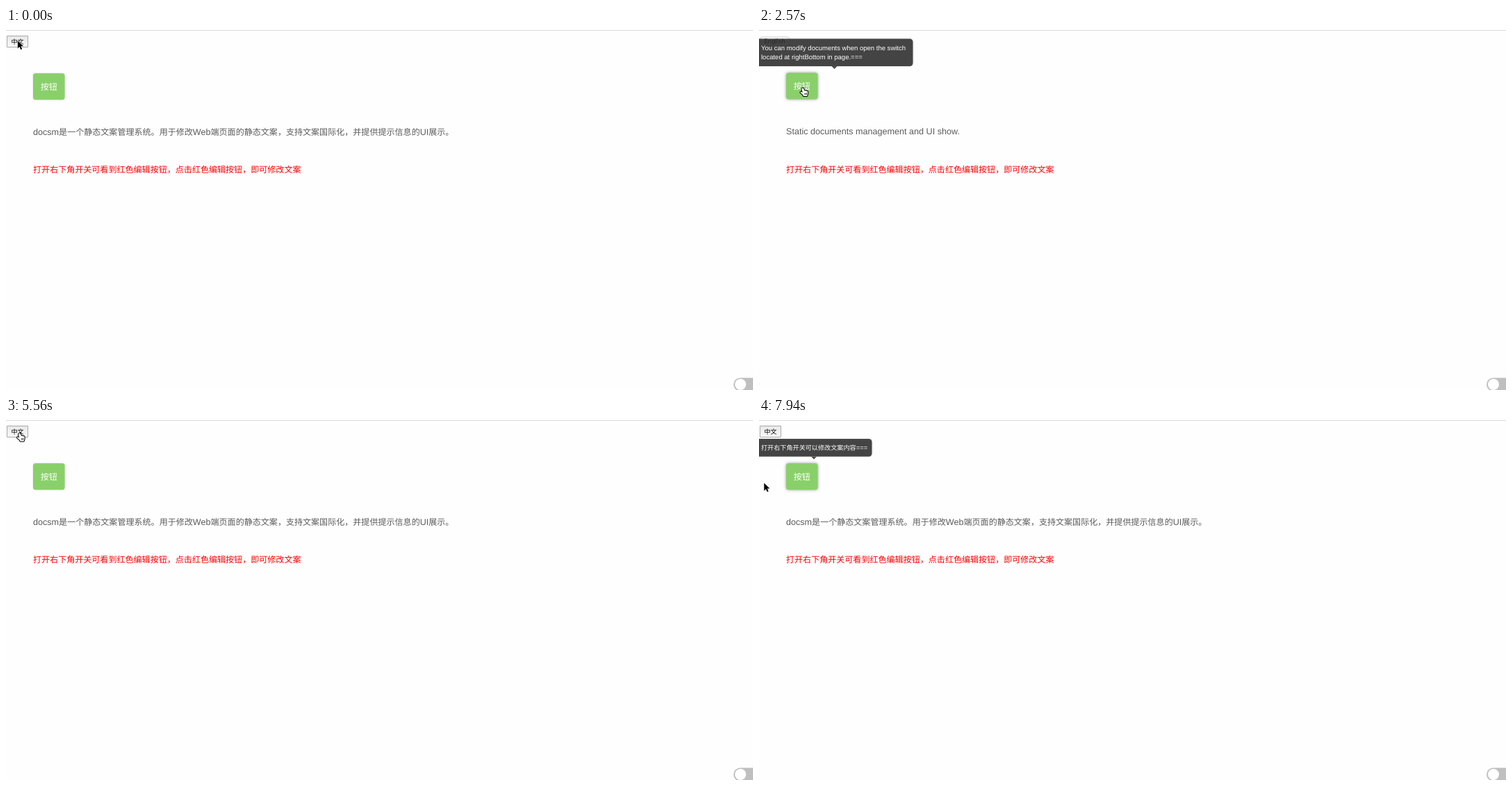
These frames come from a looping animation (1075x521 px, 8000 ms). An HTML page with a canvas:

```html
<!DOCTYPE html>
<html lang="zh-CN">
<head>
<meta charset="utf-8">
<style>
html, body { margin: 0; width: 100%; height: 100%; overflow: hidden; background: #fefefe; }
canvas { display: block; }
</style>
</head>
<body>
<canvas id="stage" width="1075" height="521"></canvas>
<script>
const ctx = document.getElementById('stage').getContext('2d');
const LOOP = 8000;
const CJK = '"Noto Sans CJK SC", "Noto Sans CJK", sans-serif';
const LATIN = '"Liberation Sans", Arial, sans-serif';

const HAND = new Path2D('M4 1.1 Q5.2 .5 5.8 1.7 L6.8 4.7 Q7.9 4.1 8.5 5 Q9.5 4.5 10.1 5.4 Q11.5 5.2 11.7 6.5 ' +
  'L11.6 9.2 L10.6 12.4 H5.6 L4.5 10.4 L1 7.4 Q.9 5.9 2.6 6.4 L4.2 7.6 L2.9 2.6 Q2.8 1.5 4 1.1 Z');
const HAND_LINES = new Path2D('M7.2 8.2 L7.5 10.7 M8.8 8 V10.6 M10.2 7.8 L10 10.4');
const ARROW = new Path2D('M0 0 V11.2 L2.6 8.8 L4.4 12.8 L6.4 12 L4.7 8 H8.2 Z');
const BEAM = new Path2D('M-2.5 -6 Q0 -6 0 -4.5 Q0 -6 2.5 -6 M0 -4.5 V4.5 M-2.5 6 Q0 6 0 4.5 Q0 6 2.5 6 M-1.5 1.5 H1.5');

// time, x, y, cursor; each pose holds until the next one
const pointer = [
  [0, 16.8, 18.3, 'arrow'], [600, 17, 22, 'hand'],
  [1970, 17, 23.5, 'hand'], [2120, 32, 46, 'arrow'], [2270, 51, 74, 'hand'], [2420, 58, 86, 'hand'],
  [2570, 58.5, 85.5, 'hand'],
  [3470, 63, 89, 'hand'], [3620, 80, 113, 'arrow'], [3770, 102, 146, 'beam'], [3910, 117, 174, 'arrow'],
  [4060, 122, 163, 'arrow'], [4210, 121.5, 152, 'beam'], [4360, 90, 112, 'arrow'], [4510, 44, 62, 'arrow'],
  [4660, 16, 36, 'arrow'], [4810, 5, 27, 'arrow'], [4960, 3, 25, 'hand'], [5110, 9, 23, 'hand'], [5260, 15, 21, 'hand'],
  [6160, 27, 42, 'arrow'], [6300, 46, 72, 'hand'], [6450, 56, 90, 'hand'], [6600, 57, 91.5, 'hand'],
  [7200, 53, 108, 'arrow'], [7350, 42, 123, 'arrow'], [7500, 28, 121, 'arrow'],
  [7650, 17, 112, 'arrow'], [7800, 10, 102, 'arrow'], [7940, 7.3, 93.5, 'arrow']
];

const within = (t, from, to) => t >= from && t < to;

// Latin runs are set slightly larger than the Chinese around them
function text(string, x, y, size, color) {
  ctx.fillStyle = color;
  for (const run of string.match(/[ -~]+|[^ -~]+/g)) {
    ctx.font = run.charCodeAt(0) < 128 ? `${size * 1.045}px ${LATIN}` : `${size}px ${CJK}`;
    ctx.fillText(run, x, y);
    x += ctx.measureText(run).width;
  }
}

function box(x, y, w, h, r, fill, border) {
  ctx.beginPath();
  ctx.roundRect(x, y, w, h, r);
  ctx.fillStyle = fill;
  ctx.fill();
  if (border) {
    ctx.strokeStyle = border;
    ctx.lineWidth = 1;
    ctx.stroke();
  }
}

function languageButton(english, pressed) {
  if (english) {
    ctx.save();
    ctx.shadowColor = 'rgba(0,0,0,.15)';
    ctx.shadowBlur = 1;
    ctx.shadowOffsetY = .5;
    box(2, 12.5, 41.5, 12.5, 3, pressed ? '#eee' : '#fff', '#e2e2e2');
    ctx.restore();
    ctx.font = '500 8.8px Inter, sans-serif';
    ctx.fillStyle = '#111';
    ctx.fillText('English', 7.3, 22.4);
    return;
  }
  const shade = ctx.createLinearGradient(0, 12, 0, 27);
  shade.addColorStop(0, pressed ? '#d2d2d2' : '#e8e8e8');
  shade.addColorStop(1, pressed ? '#e2e2e2' : '#f9f9f9');
  box(1.5, 11.5, 30, 16, 0, shade, '#aaa');
  text('中文', 7.5, 22.8, 9.1, '#000');
}

function greenButton(y, raised) {
  ctx.save();
  ctx.shadowColor = raised ? 'rgba(0,0,0,.4)' : 'rgba(0,0,0,.2)';
  ctx.shadowBlur = raised ? 4 : 2;
  box(39, y, 45.5, 38, 3.5, '#89d06a');
  ctx.restore();
  text('按钮', 49.8, y + 23.8, 12.06, '#fff');
}

function tooltip(y, w, h, tip, lines) {
  const bottom = y + h;
  ctx.save();
  ctx.shadowColor = 'rgba(0,0,0,.2)';
  ctx.shadowBlur = 2;
  box(-6, y, w + 6, h, 4.5, 'rgba(50,50,50,.88)');
  ctx.restore();
  ctx.fillStyle = '#4b4b4b';
  ctx.beginPath();
  ctx.moveTo(tip - 4, bottom);
  ctx.lineTo(tip + 4, bottom);
  ctx.lineTo(tip, bottom + 4);
  ctx.fill();
  lines.forEach((line, i) => text(line, 3, y + 16.3 + i * 13.6, 9.12, '#fff'));
}

function toggle() {
  box(1047, 503.5, 40, 19, 9.5, '#bfbfbf');
  box(1049, 505, 16, 16, 8, '#fff');
}

function outlined(path, width, outer, inner) {
  ctx.lineJoin = 'round';
  ctx.lineWidth = width;
  ctx.strokeStyle = outer;
  ctx.stroke(path);
  ctx.fillStyle = inner;
  ctx.fill(path);
}

function cursor(x, y, kind) {
  ctx.save();
  ctx.translate(x, y);
  if (kind === 'hand') {
    outlined(HAND, 2, '#000', '#fff');
    ctx.lineWidth = .7;
    ctx.stroke(HAND_LINES);
  } else if (kind === 'arrow') {
    outlined(ARROW, 1.6, '#fff', '#000');
  } else {
    ctx.lineWidth = 2.4;
    ctx.strokeStyle = '#fff';
    ctx.stroke(BEAM);
    ctx.lineWidth = 1.1;
    ctx.strokeStyle = '#111';
    ctx.stroke(BEAM);
  }
  ctx.restore();
}

function draw(t) {
  const english = within(t, 1070, 5560);
  const pressed = within(t, 780, 1070) || within(t, 5410, 5560);
  const shift = english ? -.8 : 0;

  ctx.fillStyle = '#fefefe';
  ctx.fillRect(0, 0, 1075, 521);
  ctx.fillStyle = '#dcdcdc';
  ctx.fillRect(0, 3, 1075, 1);

  languageButton(english, pressed);
  greenButton(65.3 + shift, within(t, 2270, 5560) || t >= 6300);
  text(english ? 'Static documents management and UI show.'
    : 'docsm是一个静态文案管理系统。用于修改Web端页面的静态文案，支持文案国际化，并提供提示信息的UI展示。',
    39, 153.9 + shift, 12.06, '#5c5c5c');
  text('打开右下角开关可看到红色编辑按钮，点击红色编辑按钮，即可修改文案', 39, 208.3 + shift, 12.06, '#f00');
  toggle();

  if (within(t, 2570, 4360)) {
    tooltip(15.5, 221.5, 39.5, 108.5, ['You can modify documents when open the switch', 'located at rightBottom in page.===']);
  } else if (t >= 6600) {
    tooltip(30, 162.5, 25.5, 79, ['打开右下角开关可以修改文案内容===']);
  }

  const [, x, y, kind] = pointer.findLast(pose => pose[0] <= t);
  cursor(x, y, kind);
}

ctx.textRendering = 'geometricPrecision';
const start = performance.now();
function tick() {
  draw((performance.now() - start) % LOOP);
  requestAnimationFrame(tick);
}
tick();
</script>
</body>
</html>
```
